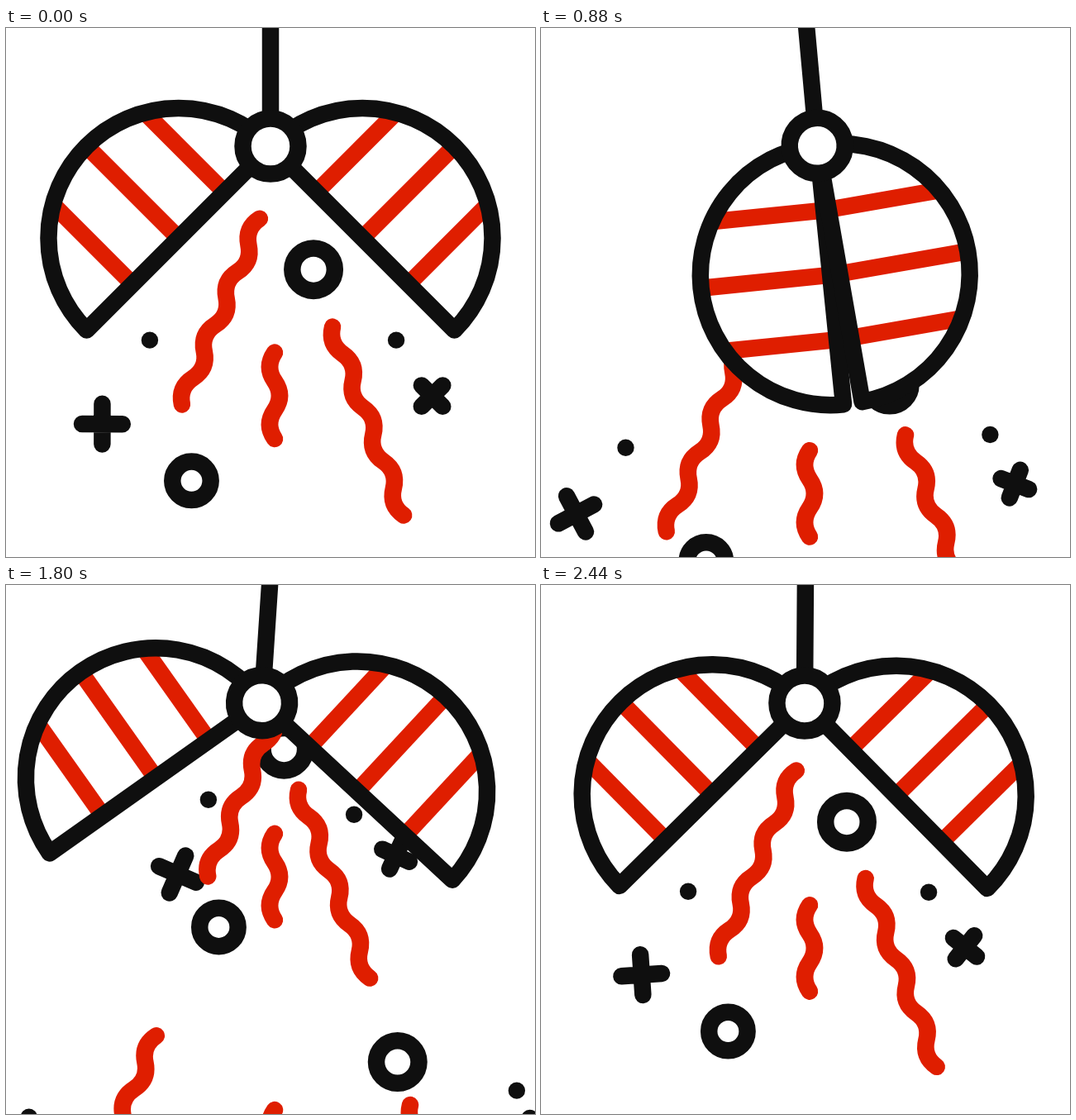
Recreate the animation shown at these times as an HTML page with a canvas. Size 640 by 640 pixels, loop 2.48 s.

```html
<!DOCTYPE html>
<html>
<head>
<meta charset="utf-8">
<style>
  html, body { margin: 0; height: 100%; overflow: hidden; background: #fff; }
  canvas { display: block; }
</style>
</head>
<body>
<canvas id="stage" width="640" height="640"></canvas>
<script>
const ctx = document.getElementById('stage').getContext('2d');
const LOOP = 2480, SPAWN = 1300, TAU = Math.PI * 2;
const BLACK = '#0f0f0f', RED = '#df1e00';
const HUB_Y = 143, PIVOT_Y = -14, RADIUS = 157.3;
const rad = deg => deg * Math.PI / 180;

const linear = u => u;
const smooth = u => u * u * (3 - 2 * u);
const easeIn = u => u ** 1.75;

// Keys are [time, value, easing towards this key]
const swing = [[0, 0], [640, 5.2, easeIn], [880, -5.2, smooth], [1240, -0.95], [1720, 4.5],
  [1800, 3.8], [2240, 2.9], [2440, 0.4], [LOOP, 0]];
const reopen = [[1480, 0], [1710, 53, smooth], [1800, 50.9, smooth], [2200, 45, smooth], [LOOP, 45]];
const leftOpen = [[0, 45], [640, 51, easeIn], [880, -0.6, smooth], [960, -2], [1240, -1.15], ...reopen];
const rightOpen = [[0, 45], [640, 51, easeIn], [880, 4.8, smooth], [960, 2], [1240, 1.15], ...reopen];

function valueAt(keys, t) {
  const i = Math.max(1, keys.findIndex(k => k[0] >= t));
  const [t0, v0] = keys[i - 1], [t1, v1, ease = linear] = keys[i];
  return v0 + (v1 - v0) * ease((t - t0) / (t1 - t0));
}

function circle(r, fill) {
  ctx.beginPath();
  ctx.arc(0, 0, r, 0, TAU);
  if (fill) {
    ctx.fillStyle = fill;
    ctx.fill();
  }
}

const ring = r => () => { circle(r); ctx.stroke(); };
const dot = () => circle(10.2, BLACK);

const cross = arm => () => {
  ctx.beginPath();
  ctx.moveTo(-arm, 0); ctx.lineTo(arm, 0);
  ctx.moveTo(0, -arm); ctx.lineTo(0, arm);
  ctx.stroke();
};

const squiggle = waves => () => {
  const step = 34.8;
  ctx.strokeStyle = RED;
  ctx.beginPath();
  ctx.moveTo(0, 0);
  for (let i = 0; i < waves; i++) {
    const y = i * step, side = i % 2 ? 8 : -8;
    ctx.bezierCurveTo(side, y + step / 3, side, y + step * 2 / 3, 0, y + step);
  }
  ctx.stroke();
};

// Speeds in px/s and deg/s: `enter` until the loop ends, `leave` afterwards
const pieces = [
  { draw: ring(25.75), x: 372, y: 292, enter: [52.5, 137.5], leave: [56.5, 158.3] },
  { draw: ring(23.2), x: 224.5, y: 547.7, enter: [-48.5, 197], leave: [-28, 111] },
  { draw: dot, x: 174, y: 377.5, enter: [-104.4, 173.5], leave: [-81.2, 147.8] },
  { draw: dot, x: 472, y: 377.5, enter: [75, 147], leave: [81, 130] },
  { draw: cross(24.4), x: 116.5, y: 479, enter: [-134, 190, 98], leave: [-84, 123.6, 70.4] },
  { draw: cross(18), x: 515.5, y: 445, angle: 45, enter: [64.7, 173.5, 162.5], leave: [65.6, 121, 75] },
  { draw: squiggle(7), x: 307, y: 230.5, angle: 22.7, enter: [-46, 151.5], leave: [-69.5, 174.8] },
  { draw: squiggle(3), x: 325, y: 392.5, enter: [0, 135], leave: [0, 134.7] },
  { draw: squiggle(7), x: 395, y: 361.5, angle: -20.7, enter: [60.3, 167.6], leave: [52.2, 148.5] }
];

function confetti(phase, seconds) {
  for (const p of pieces) {
    const [vx, vy, spin = 0] = p[phase];
    ctx.save();
    ctx.translate(p.x + vx * seconds, p.y + vy * seconds);
    ctx.rotate(rad((p.angle || 0) + spin * seconds));
    p.draw();
    ctx.restore();
  }
}

function shell(angle, side) {
  ctx.save();
  ctx.rotate(rad(angle) * -side);
  ctx.scale(side, 1);
  ctx.beginPath();
  ctx.arc(0, RADIUS, RADIUS, -Math.PI / 2, Math.PI / 2);
  ctx.closePath();
  ctx.fillStyle = '#fff';
  ctx.fill();
  ctx.save();
  ctx.clip();
  ctx.fillStyle = RED;
  for (let i = 1; i < 4; i++) ctx.fillRect(0, i * RADIUS / 2 - 10.2, RADIUS, 20.4);
  ctx.restore();
  ctx.stroke();
  ctx.restore();
}

function render(t) {
  ctx.fillStyle = '#fff';
  ctx.fillRect(0, 0, 640, 640);
  ctx.strokeStyle = BLACK;
  ctx.lineWidth = 20.5;
  ctx.lineCap = ctx.lineJoin = 'round';

  confetti('leave', t / 1000);
  if (t >= SPAWN) {
    ctx.save();
    ctx.beginPath();
    ctx.rect(0, HUB_Y, 640, 640);
    ctx.clip();
    confetti('enter', (t - LOOP) / 1000);
    ctx.restore();
  }

  ctx.save();
  ctx.translate(320, PIVOT_Y);
  ctx.rotate(rad(valueAt(swing, t)));
  ctx.translate(0, HUB_Y - PIVOT_Y);
  ctx.beginPath();
  ctx.moveTo(0, -200);
  ctx.lineTo(0, 0);
  ctx.stroke();
  shell(valueAt(leftOpen, t), -1);
  shell(valueAt(rightOpen, t), 1);
  circle(33.5, '#fff');
  ctx.stroke();
  ctx.restore();
}

const start = performance.now();
function frame() {
  render((performance.now() - start) % LOOP);
  requestAnimationFrame(frame);
}
frame();
</script>
</body>
</html>
```
